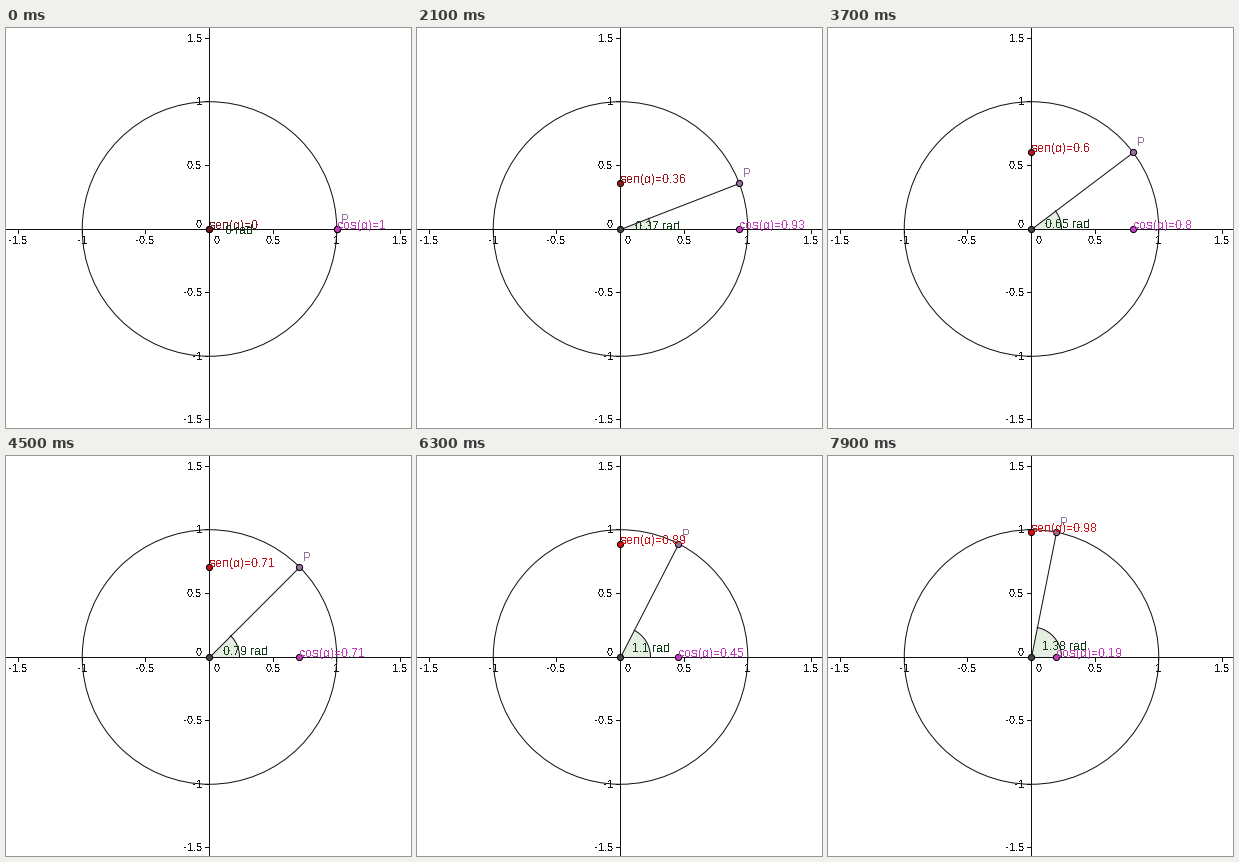
A matplotlib script for the animation above (8000 ms loop, 405 by 400 pixels).

```python
import numpy as np
import matplotlib.pyplot as plt
from matplotlib.animation import FuncAnimation
from matplotlib.patches import Circle, Wedge

plt.rcParams.update({
    "font.family": "Liberation Sans",
    "text.antialiased": False,
    "text.hinting": "native",
    "text.hinting_factor": 1,
})

W, H, DPI = 405, 400, 80
PX = 72 / DPI                    # one pixel in points
CX, CY, UNIT = 203.4, 201.05, 127.25
AXIS_X, AXIS_Y = 203.5, 201.5    # pixel centres of the two axes
MIDDLE = (203.5, 201)            # centre of the round shapes
ARC = 30
STEPS = 80                       # one degree per step

INK = "#101010"
DARK_RED, RED = np.array([[112, 22, 30], [222, 14, 20]]) / 255
COLORS = {"sin": DARK_RED, "cos": "#c53cbe", "P": "#96739e",
          "angle": "#0f3a16"}

fig = plt.figure(figsize=(W / DPI, H / DPI), dpi=DPI, facecolor="white")
ax = fig.add_axes([0, 0, 1, 1])
ax.set_xlim(0, W)
ax.set_ylim(H, 0)
ax.axis("off")


def line(xs=(), ys=(), z=1):
    return ax.plot(xs, ys, color=INK, lw=PX, zorder=z, snap=False)[0]


def label(x, y, text="", size=12, ha="left", z=6, color=INK):
    return ax.text(x, y, text, fontsize=size * PX, ha=ha, va="baseline",
                   color=color, zorder=z)


def dot(z, color):
    return ax.add_patch(Circle((AXIS_X, AXIS_Y), 3.1, fc=color, ec="black",
                               lw=PX, zorder=z))


def number(v):
    return f"{round(v, 2):g}"


# Axes with ticks and numbers
line([0, W], [AXIS_Y, AXIS_Y])
line([AXIS_X, AXIS_X], [0, H])
for v in np.arange(-1.5, 2, 0.5):
    if v == 0:
        continue
    x = np.floor(CX + v * UNIT) + 0.5
    y = np.floor(CY - v * UNIT) + 0.5
    line([x, x], [AXIS_Y, AXIS_Y + 4])
    line([AXIS_X - 4, AXIS_X], [y, y])
    label(x - 0.5, 216, number(v), 11, "center", 1)
    label(196, y + 3.5, number(v), 11, "right", 1)
label(208, 216, "0", 11, z=1)
label(196, 200, "0", 11, "right", 1)

ax.add_patch(Circle(MIDDLE, UNIT, fill=False, ec=INK, lw=PX, zorder=2))

# Moving parts
sector = ax.add_patch(Wedge(MIDDLE, ARC, 0, 0, fc="#e4efe2", ec="none",
                            zorder=0.5))
arc = line(z=3)
radius = line(z=3)
dot(4, "#444444")
dots = {name: dot(5, COLORS[name]) for name in ("P", "sin", "cos")}
texts = {name: label(0, 0, color=c) for name, c in COLORS.items()}
texts["P"].set_text("P")


def update(step):
    a = np.radians(step)
    c, s = np.cos(a), np.sin(a)
    px, py = np.round(CX + UNIT * c), np.round(CY - UNIT * s)

    t = np.linspace(0, a, 40)
    arc.set_data(MIDDLE[0] + ARC * np.cos(t), MIDDLE[1] - ARC * np.sin(t))
    radius.set_data([AXIS_X, px + 0.5], [AXIS_Y, py + 0.5])
    sector.set_theta1(-step)     # y points down, so angles are negative
    for part in (sector, arc):
        part.set_visible(step > 0)

    dots["P"].center = px + 0.5, py + 0.5
    dots["sin"].center = AXIS_X, py + 0.5
    dots["cos"].center = px + 0.5, AXIS_Y

    texts["P"].set_position((px + 4, py - 6))
    texts["sin"].set_position((203, py))
    texts["cos"].set_position((px, 201))
    texts["angle"].set_position((np.floor(198.4 + 20.6 * np.cos(a / 2)),
                                 np.round(205.5 - 17.6 * np.sin(a / 2))))
    texts["sin"].set_text(f"sen(α)={number(s)}")
    texts["cos"].set_text(f"cos(α)={number(c)}")
    texts["angle"].set_text(f"{number(a)} rad")

    # The sine brightens as it grows
    red = DARK_RED + (RED - DARK_RED) * s
    dots["sin"].set_facecolor(red)
    texts["sin"].set_color(red)
    return [sector, arc, radius, *dots.values(), *texts.values()]


anim = FuncAnimation(fig, update, frames=STEPS, interval=100, repeat=True,
                     repeat_delay=0, blit=False)
plt.show()
```
